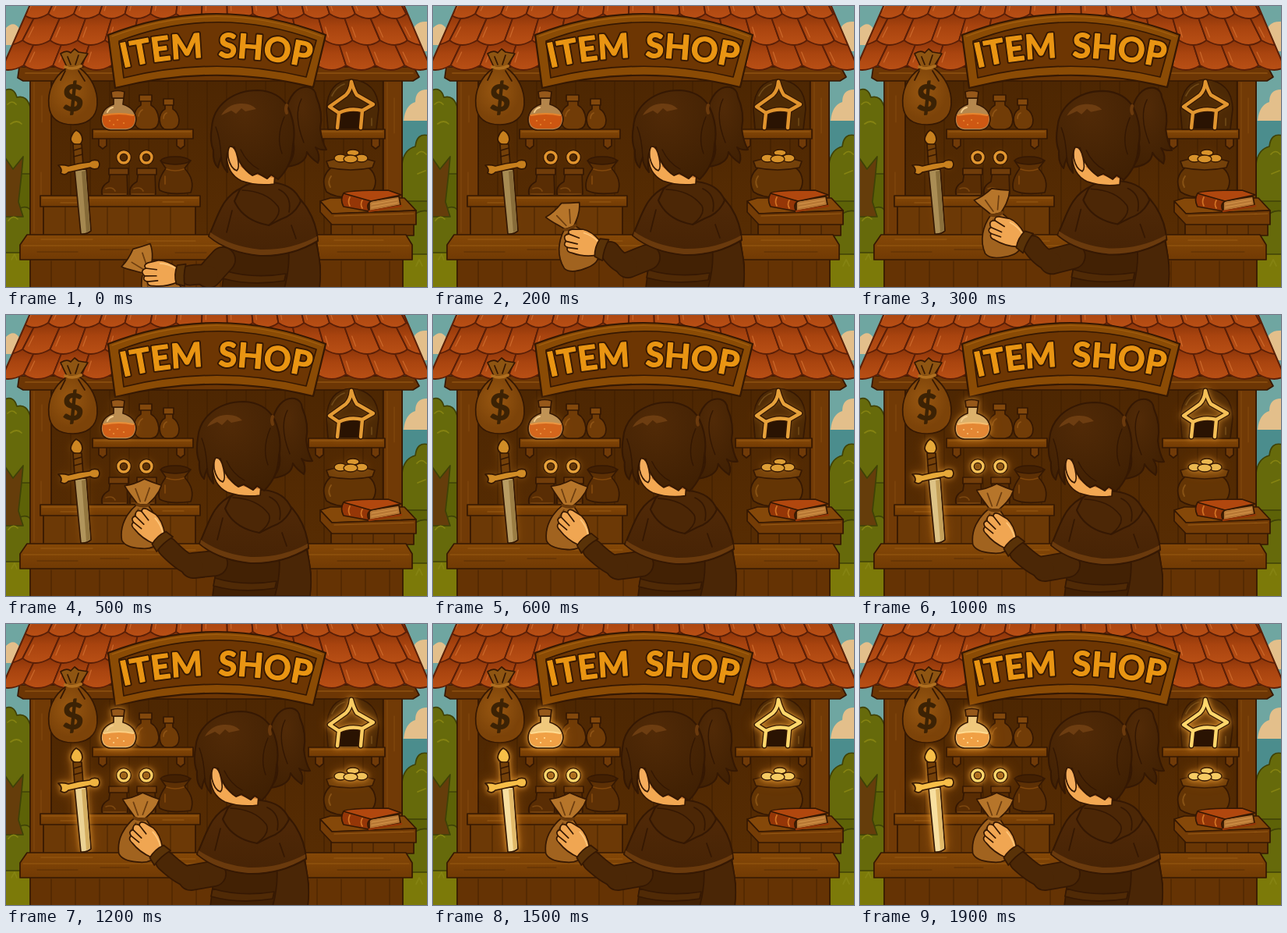
Write an HTML page that moves like this. It is 540 by 360 pixels and loops after 2 s.

```html
<!DOCTYPE html>
<html lang="en">
<head>
<meta charset="utf-8">
<title>Item shop</title>
<style>
  html, body { margin: 0; width: 100%; height: 100%; overflow: hidden; background: #522a03; }
  svg { display: block; width: 540px; height: 360px; }
  .line { fill: none; }
  .plain { stroke: none; }
  .dull { --gold: #c67d1c; --rim: #e0922c; --blade: #a58850; --shade: #856a38; --glass: #b2834a; --liquid: #cc5410; --foam: #e68029; --coin: #d69028; }
  .bright { --gold: #f7be48; --rim: #ffd76c; --blade: #f8dfa0; --shade: #e2ba69; --glass: #f0c87c; --liquid: #f0a045; --foam: #ffdb91; --coin: #f6cb63;
    filter: drop-shadow(0 0 3px #efaa3dcc) drop-shadow(0 0 7px #d77b1b99); }
</style>
</head>
<body>
<svg viewBox="0 0 540 360" stroke="#351803" stroke-width="1.7" stroke-linejoin="round" stroke-linecap="round">
  <defs>
    <linearGradient id="tile" x2="0" y2="1"><stop stop-color="#8a3409"/><stop offset=".45" stop-color="#a9440f"/><stop offset="1" stop-color="#b94f15"/></linearGradient>
    <linearGradient id="wall" x2="0" y2="1"><stop stop-color="#4c2602"/><stop offset="1" stop-color="#5a2e03"/></linearGradient>
    <linearGradient id="wood" x2="0" y2="1"><stop stop-color="#854807"/><stop offset="1" stop-color="#713a04"/></linearGradient>
    <radialGradient id="sack" cx=".42" cy=".4"><stop stop-color="#985711"/><stop offset="1" stop-color="#7c4309"/></radialGradient>
    <radialGradient id="hair" cx=".4" cy=".25" r=".8"><stop stop-color="#512a07"/><stop offset="1" stop-color="#402003"/></radialGradient>
    <linearGradient id="cloth" x2="0" y2="1"><stop stop-color="#522a08"/><stop offset="1" stop-color="#462305"/></linearGradient>
    <clipPath id="gable"><path d="M31 -2H510L542 73V92H-2V73Z"/></clipPath>
    <path id="arch" d="M150 79Q268 52 396 80"/>
    <path id="opening" d="M443 97Q442 108 436 114L415 129L427 137L425 156M443 97Q446 108 450 114L471 126L457 134L455 156M427 137Q441 130 457 134"/>
    <text id="name" font-family="Lato, 'Open Sans', sans-serif" font-weight="700" font-size="43" word-spacing="9"><textPath href="#arch">ITEM SHOP</textPath></text>

    <g id="treasure">
      <g fill="var(--gold)">
        <path d="M90 159Q98 163 98 171Q97 178 91 178Q84 177 83 171Q84 163 90 159Z"/>
        <path fill="var(--blade)" d="M88 210L103 209L109 288Q103 293 96 292Z"/>
        <path class="plain" fill="var(--shade)" d="M97 212L102 211L108 287L103 290Z"/>
        <path fill="#744009" d="M86 177L97 177L99 204L88 205Z"/>
        <path class="line" d="M87 185L97 182M87 193L98 190"/>
        <path d="M67 204Q74 203 80 205Q94 201 107 200Q111 196 118 198Q122 203 118 208Q112 210 108 207L80 213Q76 218 70 214Q73 209 67 204Z"/>
      </g>
      <path fill="var(--glass)" d="M138 118L151 118L150 126Q166 131 167 145Q166 158 154 159H134Q122 158 122 145Q123 131 138 126Z"/>
      <path class="plain" fill="var(--liquid)" d="M124 140Q145 136 165 140Q167 156 154 157H134Q122 156 124 140Z"/>
      <path class="line" stroke="var(--foam)" stroke-width="2.2" d="M126 140Q145 136 163 140M133 147h.1M143 146h.1M151 150h.1M138 152h.1"/>
      <path fill="#96581a" d="M135 110Q143 107 152 110L151 118H136Z"/>
      <path class="line" stroke="#f4cd8c" stroke-width="2" d="M130 136Q132 131 137 130"/>
      <g fill="none">
        <circle cx="151" cy="194" r="7" stroke-width="6"/><circle cx="180" cy="194" r="7" stroke-width="6"/>
        <g stroke="var(--rim)" stroke-width="3.4"><circle cx="151" cy="194" r="7"/><circle cx="180" cy="194" r="7"/></g>
        <path class="plain" fill="#2a1302" d="M427 138Q441 131 456 135L454 157H426Z"/>
        <use href="#opening" stroke-width="7"/>
        <use href="#opening" stroke="var(--rim)" stroke-width="4.4"/>
      </g>
      <g fill="var(--coin)" stroke-width="1.3">
        <ellipse cx="429" cy="195" rx="8" ry="5"/><ellipse cx="456" cy="195" rx="8" ry="5"/><ellipse cx="445" cy="188" rx="8" ry="4"/><ellipse cx="442" cy="196" rx="9" ry="5"/>
      </g>
    </g>
  </defs>

  <g class="plain" stroke="none">
    <path fill="#6fa6a1" d="M0 0H540V360H0Z"/>
    <path fill="#e3bf8b" d="M0 28Q10 18 17 29L24 50H0ZM540 20Q522 19 521 37Q514 43 522 58H540ZM540 107Q525 107 525 123Q512 127 510 147H540Z"/>
    <path fill="#4b8d8d" d="M508 147H540V270H508Z"/>
    <path fill="#5d6207" d="M0 135H33V300H0ZM508 225H540V300H508Z"/>
    <path fill="#7c7a09" d="M0 298H540V360H0Z"/>
  </g>
  <g fill="#666a0b" stroke="#3f4207">
    <path d="M-2 108Q10 103 14 117Q27 113 32 132V215H-2Z"/>
    <path d="M-2 258Q10 247 18 259Q29 254 34 266V316H-2ZM542 166Q527 162 525 180Q510 184 508 203V250H542ZM542 263Q527 260 520 273L508 281V318H542Z"/>
    <path fill="#653d0b" d="M-2 193L9 209L22 193L20 215L16 251L22 270H-2Z"/>
    <path class="line" stroke="#858312" d="M2 126Q8 120 13 126M6 151Q14 145 20 151M527 190Q533 183 539 190M528 215L538 211M3 275Q9 267 15 273M7 325l4-7 3 7M526 333l4-8 4 8"/>
  </g>

  <path fill="url(#wall)" d="M32 75H508V360H32Z"/>
  <g id="planks" stroke="#422003" stroke-width="1.2" fill="none"></g>
  <path fill="#713a06" d="M31 87H58V294H31ZM484 87H508V294H484Z"/>
  <path class="line" stroke="#854a0f" stroke-width="1" d="M36 98V290M489 98V247M46 115V149M45 213V245M498 118V163"/>
  <path fill="#6c3605" d="M17 78H523L530 91L522 96H22L15 92Z"/>
  <path class="line" stroke="#8f5110" d="M25 86H522"/>
  <g id="roof" fill="url(#tile)" stroke="#5a1f07" stroke-width="1.9" clip-path="url(#gable)"></g>
  <path class="line" stroke="#5a1f07" stroke-width="2" d="M31 -2L-2 73M510 -2L542 73"/>

  <path fill="#8a4b05" stroke-width="2.2" d="M131 37Q270 -17 410 37L394 104Q269 73 140 105Z"/>
  <path fill="#6d3603" d="M145 45Q270 -3 398 44L385 91Q269 63 151 92Z"/>
  <path class="line" stroke="#a4600f" stroke-width="1.2" d="M136 39Q270 -12 405 39"/>
  <use href="#name" fill="none" stroke-width="5"/>
  <use href="#name" fill="#e99513" stroke="#e99513" stroke-width="1.3"/>

  <path fill="url(#sack)" d="M77 80C61 91 53 109 55 128C57 147 70 152 86 152C103 152 116 144 117 126C118 107 109 90 94 79Z"/>
  <path fill="#8e5512" d="M78 78L70 61Q78 56 83 60L88 55L93 59L105 61L94 79Z"/>
  <path class="line" stroke="#af6f20" stroke-width="4" d="M76 78Q86 82 96 77"/>
  <path class="line" d="M79 65L83 75M93 63L89 75M76 83L70 95M93 83L101 96"/>
  <text x="86" y="135" text-anchor="middle" font-family="Lato, sans-serif" font-weight="900" font-size="47" fill="#3c2204" stroke="none">$</text>

  <g fill="#703a08">
    <path d="M119 169H129V179L124 183L119 179ZM219 169H229V179L224 183L219 179ZM397 169H407V179L402 183L397 179ZM469 169H479V179L474 183L469 179Z"/>
    <path fill="url(#wood)" d="M111 158H240V170H111ZM388 158H486V170H388Z"/>
    <path class="line" stroke="#985a15" stroke-width="1.1" d="M114 161H237M391 161H483"/>
  </g>
  <g fill="#713c07">
    <path d="M173 121V127Q164 132 164 145Q165 158 175 158H186Q196 157 196 145Q195 132 186 127V121ZM204 126V132Q197 136 197 146Q198 158 206 158H213Q222 157 222 146Q221 136 214 132V126Z"/>
    <path fill="#82480c" d="M171 114H187V122H171ZM202 119H215V127H202Z"/>
    <path class="line" stroke="#8e5315" d="M170 141Q171 135 175 133M202 144Q202 139 206 137"/>
  </g>
  <g id="boots" fill="#592d04"></g>
  <path fill="#5d3005" d="M205 208Q193 224 197 236Q210 243 237 239Q243 223 229 208L237 198Q218 190 198 198Z"/>
  <ellipse cx="217" cy="198" rx="18" ry="5" fill="#432002"/>
  <path class="line" stroke="#82480d" d="M206 209Q217 213 228 209M204 218V228"/>
  <path fill="#6c3906" d="M48 256H243V294H48Z"/>
  <path class="line" stroke="#512803" stroke-width="1.3" d="M76 258V292M103 258V292M130 258V292M157 258V292M184 258V292M211 258V292"/>
  <path fill="url(#wood)" d="M44 243H249V257H44Z"/>
  <path class="line" stroke="#985a15" stroke-width="1.1" d="M47 246H246M70 252H105M201 251H228"/>

  <path fill="#4c2905" d="M413 158L411 132Q413 96 443 94Q477 97 478 132L475 158Z"/>
  <path class="line" stroke="#6e4817" d="M418 115Q424 103 434 100M469 144V153"/>
  <path fill="#643505" d="M417 207Q402 220 411 238Q423 247 451 245Q474 243 474 224Q473 213 465 207Z"/>
  <path fill="#74410a" d="M411 199Q441 190 473 199L470 207Q442 213 414 207Z"/>
  <path class="line" stroke="#875214" stroke-width="2" d="M417 218Q412 225 416 232"/>
  <use href="#treasure" class="dull"/>
  <use id="glow" href="#treasure" class="bright"/>

  <path fill="#693605" d="M417 276H523V294H417Z"/>
  <path class="line" stroke="#4d2604" d="M444 281V294M471 281V294M498 281V294"/>
  <path fill="#854809" d="M403 250L416 246H511L526 262L418 266Z"/>
  <path fill="#743c06" d="M403 250L418 266L526 262V280H418L403 264Z"/>
  <path class="line" stroke="#985a15" stroke-width="1.1" d="M421 269L523 266"/>
  <g>
    <path fill="#b87835" d="M466 250L504 244L506 255L466 263Z"/>
    <path class="line" stroke="#d6964a" stroke-width="1" d="M469 254L502 248M469 258L502 252"/>
    <path fill="#b1470e" d="M433 240Q436 236 490 236L507 242L468 250L433 244Z"/>
    <path fill="#953607" d="M433 240Q428 248 433 257L466 263Q461 255 468 250Z"/>
    <path class="line" stroke="#d37425" d="M441 245Q438 251 441 256M457 249Q454 254 457 259"/>
    <path class="line" stroke="#953607" stroke-width="2.4" d="M466 263L507 256"/>
  </g>

  <path fill="#653304" d="M31 323H509V362H31Z"/>
  <path id="frontPlanks" class="line" stroke="#4e2703" stroke-width="1.3"/>
  <path fill="url(#wood)" d="M27 293H513L521 306V325H18V306Z"/>
  <path class="line" stroke="#985a13" stroke-width="1.2" d="M22 307H517M45 299H111M181 301H243M421 300H484"/>
  <path class="line" stroke="#5a2f05" stroke-width="1" d="M40 315H92M121 312H158M217 316H257M425 315H493"/>

  <g id="bag">
    <path fill="#a1631f" d="M-7 0C-20 12 -28 29 -24 47Q-19 56 0 56Q19 57 23 46C26 29 18 12 7 0Z"/>
    <path fill="#b6752a" d="M-6 0C-13 -9 -20 -16 -24 -23Q-12 -25 1 -33Q12 -29 23 -26C20 -14 12 -6 6 0Z"/>
    <path class="line" stroke="#6d3e10" d="M-10 -20L-3 -4M8 -22L3 -5M-5 6L-12 19M6 6L12 17"/>
    <path class="line" stroke="#6a3a0b" stroke-width="4" d="M-7 0Q0 3 8 0"/>
  </g>

  <g id="body">
    <path fill="#422104" d="M285 298L277 362H402L403 333L398 298Z"/>
    <path fill="#4a2606" d="M362 307Q365 332 357 362H402Q406 334 397 300Z"/>
    <path fill="#502a06" d="M280 339Q317 350 359 343L357 352Q314 359 278 349Z"/>
  </g>
  <g class="line">
    <path class="upperArm" stroke-width="34"/><path class="forearm" stroke-width="27"/>
    <g stroke="#4b2706"><path class="upperArm" stroke-width="30.5"/><path class="forearm" stroke-width="23.5"/></g>
  </g>
  <g id="hand">
    <path fill="#f0a652" d="M3 -9C-5 -14 -14 -18 -23 -17L-36 -13Q-42 -10 -38 -6Q-45 -3 -41 2L-39 4Q-42 10 -35 11Q-35 17 -27 16Q-12 17 3 10Z"/>
    <path class="line" d="M-38 -6L-24 -5M-39 4L-24 3M-35 11L-22 9"/>
    <path class="line" stroke="#ffc77b" d="M-20 -13Q-9 -13 0 -8"/>
    <path fill="#593208" d="M2 -12Q-2 0 2 12L13 14Q10 0 13 -14Z"/>
  </g>

  <g id="cape" fill="url(#cloth)">
    <path stroke-width="2.1" d="M260 295C272 270 276 244 304 232L354 230C382 244 398 272 400 301Q366 321 326 320Q285 316 260 295Z"/>
    <path class="plain" fill="#6a3a0d" d="M262 290Q288 308 326 312Q366 313 399 295L399 300Q366 320 326 319Q285 315 261 295Z"/>
    <path class="line" stroke="#351803" d="M290 262L283 290M366 281L372 298"/>
    <path stroke-width="2.1" fill="#4c2706" d="M299 237Q306 224 342 226Q370 229 378 250Q371 267 353 273L337 281Q304 275 293 250Z"/>
    <path class="line" d="M303 236Q334 237 349 257Q354 268 337 281M350 235Q367 243 363 264"/>
  </g>
  <g id="head" fill="url(#hair)">
    <path fill="#f3a852" d="M283 190Q283 215 302 224Q322 231 344 228L345 214L310 192Z"/>
    <path class="plain" fill="#c97931" d="M300 205Q315 218 344 220L344 214L310 196Z"/>
    <path stroke-width="2.1" d="M359 137C362 115 374 102 388 104Q397 106 398 116Q407 137 403 157Q405 174 411 184Q402 185 397 181Q404 192 400 201Q390 194 386 187Q385 203 360 206Q374 190 367 169Z"/>
    <path stroke-width="2.1" d="M272 207Q265 201 266 185Q261 173 264 155C266 127 291 108 323 108Q350 109 362 130Q373 155 368 178Q367 205 349 222L340 216L335 221L323 214L316 217Q298 205 293 181L286 183Q281 194 284 213Q276 204 276 194Q273 201 272 207Z"/>
    <path fill="#f5ad5c" d="M287 180Q294 179 297 194Q300 208 296 211Q288 208 285 194Q284 184 287 180Z"/>
    <path class="plain" fill="#6d3d11" d="M276 140Q284 126 300 125Q314 124 321 132L307 135L302 131L295 138L289 134Z"/>
    <path class="line" stroke="#331703" stroke-width="1.4" d="M269 155Q275 170 276 194M301 184Q309 201 324 209M357 142Q346 168 354 189M379 119Q368 140 382 175"/>
    <path class="line" stroke="#6b3a0d" stroke-width="4" d="M360 127Q358 132 360 137"/>
  </g>
</svg>
<script>
const $ = id => document.getElementById(id);
const range = (n, f) => Array.from({ length: n }, (_, i) => f(i)).join("");

$("planks").innerHTML = range(18, i => `<path d="M${58 + i * 25} 90V292"/>`);
$("frontPlanks").setAttribute("d", range(15, i => `M${58 + i * 31} 327V360`));
$("boots").innerHTML = [0, 36].map(x => `<g transform="translate(${x})">
  <path d="M134 211L132 225Q121 231 123 241Q137 246 156 241L155 211Z"/>
  <path fill="#703c0a" d="M132 208H157V216H132Z"/>
  <path class="line" stroke="#7c4710" d="M128 234Q137 231 140 237M125 241H154"/></g>`).join("");

function tileRow(top, bottom, shift) {
  const fan = (x, y) => (270 + (x - 270) * (1 - (82 - y) * .0019)).toFixed(1);
  return range(17, i => {
    const x = -36 + shift + i * 38, end = x + 38, low = bottom - 5;
    return `<path d="M${fan(x, top)} ${top}H${fan(end, top)}L${fan(end, low)} ${low}Q${fan(x + 19, bottom)} ${bottom + 7} ${fan(x, low)} ${low}Z"/>
      <path class="line" stroke="#cb682a" stroke-width="1.2" d="M${fan(x + 6, low - 17)} ${low - 17}L${fan(x + 6, low - 4)} ${low - 4}"/>`;
  });
}
$("roof").innerHTML = tileRow(42, 81, 18) + tileRow(8, 49, 0) + tileRow(-26, 15, 18);

// time, head x/y, cape x/y, bag x/y/turn, hand turn, cuff x/y, elbow x/y, shoulder x/y
const poses = [
  [0, 0, 0, 0, 0, 181, 339, -35, 3, 217, 344, 252, 345, 278, 325],
  [200, -7, 0, -4, -1, 175, 284, -20, 17, 209, 309, 242, 332, 275, 322],
  [500, -18, 3, -12, -2, 175, 243, 3, 48, 195, 284, 232, 321, 268, 318],
  [700, -21, 4, -15, 0, 172, 249, 4, 48, 192, 290, 229, 325, 266, 320]
];
const glowSteps = [[0, 0], [200, .03], [500, .15], [800, .45], [1000, .68], [1500, 1]];

// Smooth curve through the rows, at rest at both ends.
function sample(rows, time) {
  const next = rows.findIndex(row => row[0] > time);
  if (next < 0) return rows.at(-1).slice(1);
  const a = rows[next - 1], b = rows[next], span = b[0] - a[0], t = (time - a[0]) / span;
  const slope = (i, column) => {
    const before = rows[i - 1], after = rows[i + 1];
    return before && after ? (after[column] - before[column]) / (after[0] - before[0]) * span : 0;
  };
  return a.slice(1).map((from, i) => {
    const step = b[i + 1] - from, m = slope(next - 1, i + 1), n = slope(next, i + 1);
    return from + t * (m + t * (3 * step - 2 * m - n + t * (m + n - 2 * step)));
  });
}
const place = (id, x, y, turn = 0) => $(id).setAttribute("transform", `translate(${x} ${y}) rotate(${turn})`);
const trace = (name, d) => document.querySelectorAll("." + name).forEach(path => path.setAttribute("d", d));

function draw(time) {
  const [hx, hy, cx, cy, bx, by, bagTurn, handTurn, wx, wy, ex, ey, sx, sy] = sample(poses, time);
  place("head", hx, hy);
  place("cape", cx, cy);
  place("body", cx, cy);
  place("bag", bx, by, bagTurn);
  place("hand", wx, wy, handTurn);
  const angle = handTurn * Math.PI / 180;
  const armX = wx + 19 * Math.cos(angle), armY = wy + 19 * Math.sin(angle);
  trace("forearm", `M${armX} ${armY}Q${ex - 4} ${ey - 2} ${ex + 8} ${ey}`);
  trace("upperArm", `M${ex + 8} ${ey}L${sx} ${sy}`);
  $("glow").setAttribute("opacity", sample(glowSteps, time)[0]);
}

const start = performance.now();
function tick() {
  draw(Math.floor((performance.now() - start) % 2000 / 100) * 100);
  requestAnimationFrame(tick);
}
tick();
</script>
</body>
</html>
```
